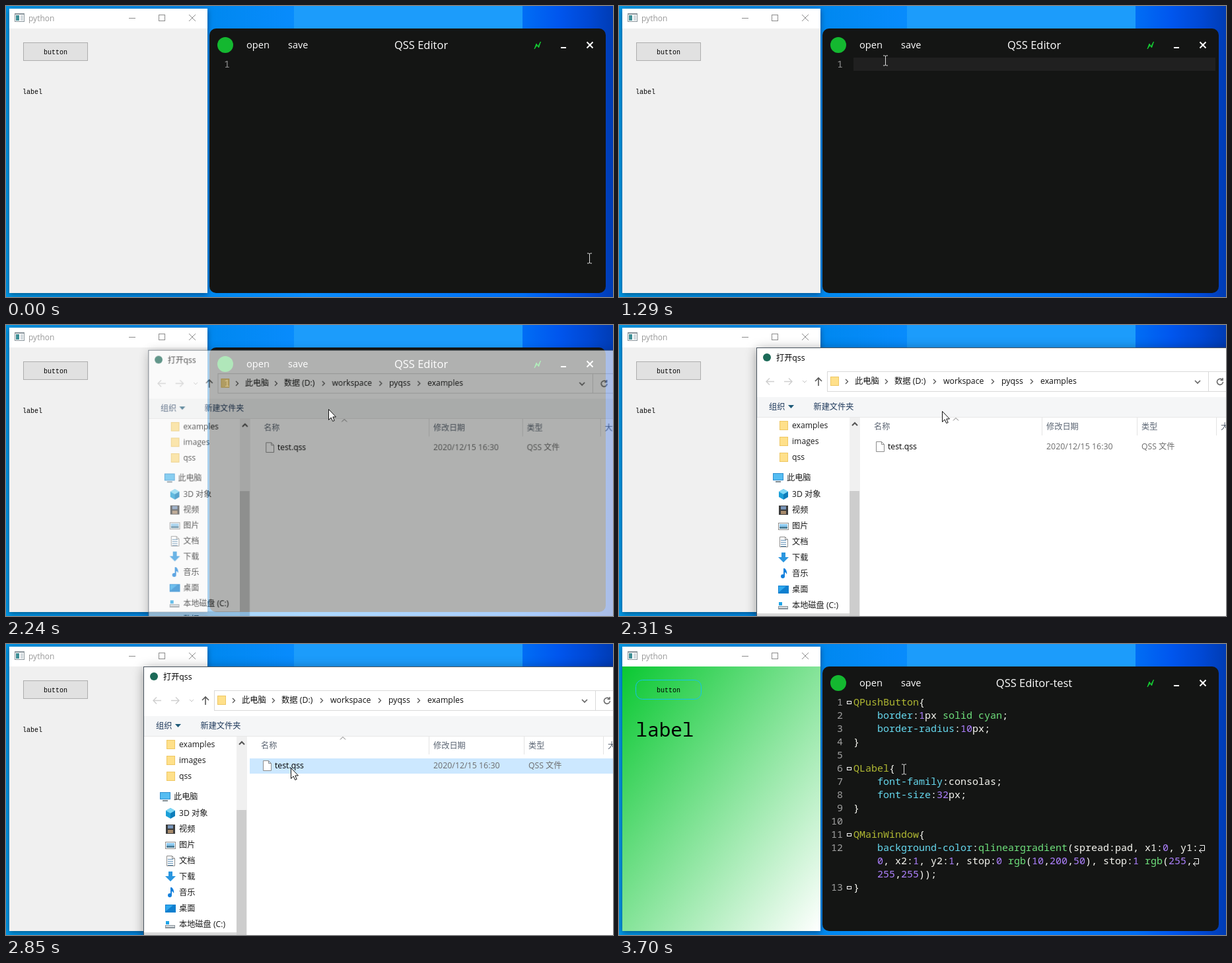
Recreate the animation shown at these times as an HTML page with a canvas. Size 919x440 px, loop 4.73 s.

```html
<!DOCTYPE html>
<html lang="en">
<head>
<meta charset="utf-8">
<title>QSS Editor</title>
<style>
  html, body { margin: 0; width: 100%; height: 100%; overflow: hidden; background: #0088f0; }
  canvas { display: block; }
</style>
</head>
<body>
<canvas id="stage" width="919" height="440"></canvas>
<script>
const LOOP = 4730;
const SANS = '"Open Sans", "Noto Sans CJK SC", "Noto Sans CJK", sans-serif';
const MONO = '"Noto Sans Mono", monospace';
const PIXEL = '"Liberation Mono", monospace';

const screen2d = document.getElementById('stage').getContext('2d');
const layer = document.createElement('canvas');
layer.width = 1100;
layer.height = 520;
const layer2d = layer.getContext('2d');
let g = screen2d;

const bursts = [[70, 510, 7], [680, 1140, 7], [1220, 1690, 7], [1760, 1840, 2],
  [2010, 2470, 7], [2540, 2700, 3], [2850, 3170, 5], [3700, 3700, 1]];

// Pointer stops: [time, x, y]
const path = [[0, 883, 381], [510, 649, 280], [604, 649, 280], [1140, 415, 94], [1298, 403, 82],
  [1690, 392, 62], [1950, 392, 62], [2087, 437, 107], [2240, 488, 127], [2393, 490, 132],
  [2470, 488, 140], [2700, 431, 187], [3170, 431, 187], [3700, 431, 189], [LOOP, 431, 189]];

const code = [
  'QPushButton{', '    border:1px solid cyan;', '    border-radius:10px;', '}', '',
  'QLabel{', '    font-family:consolas;', '    font-size:32px;', '}', '',
  'QMainWindow{', '    background-color:qlineargradient(spread:pad, x1:0, y1:',
  '    0, x2:1, y2:1, stop:0 rgb(10,200,50), stop:1 rgb(255,', '    255,255));', '}'];
const tokens = /(^Q\w+)|(^ +[a-z-]+)|\b(\d+)|(solid|cyan|qlineargradient|rgb)|./g;
const tokenColors = ['#b0b832', '#66d9ef', '#ae81ff', '#6fe07c'];

const clamp = v => Math.max(0, Math.min(1, v));

function rect(x, y, w, h, color) {
  g.fillStyle = color;
  g.fillRect(x, y, w, h);
}
function frame(x, y, w, h, color) {
  g.strokeStyle = color;
  g.lineWidth = 1;
  g.strokeRect(x + .5, y + .5, w - 1, h - 1);
}
function round(x, y, w, h, r, color) {
  g.beginPath();
  g.roundRect(x, y, w, h, r);
  g.fillStyle = color;
  g.fill();
}
function disc(x, y, r, color) {
  round(x - r, y - r, 2 * r, 2 * r, r, color);
}
function text(str, x, y, size, color, font = SANS, align = 'left') {
  g.font = `${size}px ${font}`;
  g.textAlign = align;
  g.fillStyle = color;
  g.fillText(str, x, y);
}
function shape(x, y, d, fill, stroke, width = 1) {
  const p = new Path2D(d);
  g.save();
  g.translate(x, y);
  if (fill) { g.fillStyle = fill; g.fill(p); }
  if (stroke) { g.strokeStyle = stroke; g.lineWidth = width; g.stroke(p); }
  g.restore();
}
function withShadow(blur, alpha, draw) {
  g.save();
  g.shadowColor = `rgba(0,0,0,${alpha})`;
  g.shadowBlur = blur;
  g.shadowOffsetY = 2;
  draw();
  g.restore();
}
function gradient(x0, y0, x1, y1, stops) {
  const fill = g.createLinearGradient(x0, y0, x1, y1);
  stops.forEach(([at, color]) => fill.addColorStop(at, color));
  return fill;
}

function refreshTime(t) {
  let last = 0;
  for (const [from, to, count] of bursts)
    for (let i = 0; i < count; i++) {
      const at = from + (to - from) * i / Math.max(1, count - 1);
      if (at <= t + 9) last = at;
    }
  return last;
}
function pointerAt(t) {
  const i = Math.max(1, path.findIndex(p => p[0] >= t));
  const [t0, x0, y0] = path[i - 1], [t1, x1, y1] = path[i];
  const k = (t - t0) / (t1 - t0);
  return [Math.round(x0 + (x1 - x0) * k), Math.round(y0 + (y1 - y0) * k)];
}

function drawDesktop() {
  rect(0, 0, 919, 440, gradient(0, 0, 919, 0, [[0, '#0098e8'], [.34, '#0088f0'], [.5, '#0a8cff'],
    [.85, '#006ef5'], [.91, '#0056ee'], [.96, '#0048d4'], [1, '#003cb4']]));
  rect(436, 0, 346, 60, '#1c9cfb');
}

function drawPreview(styled) {
  withShadow(8, .45, () => rect(5, 4, 300, 430, '#fff'));
  rect(13, 11, 15, 13, '#8a959c');
  rect(14, 13, 13, 10, '#fff');
  rect(15, 14, 5, 8, '#3f8f96');
  rect(22, 14, 4, 8, '#d3dadf');
  text('python', 34, 23, 12, '#999');
  rect(186, 18, 10, 1, '#8c8c8c');
  frame(231, 13, 10, 10, '#8c8c8c');
  shape(277, 13, 'M0 0L10 10M10 0L0 10', null, '#8c8c8c');

  if (styled) {
    // Equal-colour lines run parallel to the other diagonal
    g.save();
    g.translate(5, 34);
    g.scale(300, 400);
    rect(0, 0, 1, 1, gradient(0, 0, 1, 1, [[0, 'rgb(10,200,50)'], [1, '#fff']]));
    g.restore();
    g.beginPath();
    g.roundRect(25.5, 54.5, 99, 29, 10);
    g.strokeStyle = '#14c4ea';
    g.lineWidth = 1;
    g.stroke();
    text('label', 25.5, 140, 29.3, '#000', MONO);
  } else {
    rect(5, 34, 300, 400, '#f0f0f0');
    rect(26, 55, 98, 28, '#e1e1e1');
    frame(26, 55, 98, 28, '#adadad');
    text('label', 25, 133, 10, '#000', PIXEL);
  }
  text('button', 57, 73, 10, '#000', PIXEL);
}

function drawCode() {
  code.forEach((row, i) => {
    const y = 93 + 20 * i;
    const number = i < 12 ? i + 1 : i === 14 ? 13 : '';
    text(number, 339, y, 15, '#a0a0a0', MONO, 'right');
    if (/^Q/.test(row) || i === 14) frame(345, y - 7, 7, 5, '#fff');
    for (const m of row.matchAll(tokens)) {
      const kind = m.slice(1).findIndex(Boolean);
      text(m[0], 355 + 9 * m.index, y, 15, tokenColors[kind] || '#f8f8f2', MONO);
    }
    if (i === 11 || i === 12)
      shape(355.5 + 9 * row.length, y - 9, 'M2 .5H9V8.5H1M4.5 5L1 8.5L4.5 12', null, '#fff');
  });
}

function drawEditor(t, loaded) {
  round(308, 34, 600, 400, 10, '#141514');
  disc(332, 59, 12, '#14b830');
  if (t >= 1370 && t < 2160)
    round(352, 38, 60, 40, 20, t >= 1755 && t < 1835 ? '#10702a' : '#14541f');
  text('open', 364, 64, 14.7, '#fff');
  text('save', 427, 64, 14.5, '#fff');
  text(loaded ? 'QSS Editor-test' : 'QSS Editor', 628.5, 65, 16.5, '#fff', SANS, 'center');
  shape(799, 53, 'M1 12L4 4L6.5 8L10.5 1L7.5 10L5 6.5Z', '#14c832', '#14c832');
  rect(840, 62, 8, 2, '#fff');
  shape(879.5, 54.5, 'M0 0L9 9M9 0L0 9', null, '#fff', 2);

  if (loaded) return drawCode();
  text('1', 339, 93, 15, '#909090', MONO, 'right');
  if (t >= 505 && t < 1755) {
    rect(355, 78, 548, 20, '#202020');
    if ((t - 505) % 1060 < 530) rect(355, 79, 1, 18, '#f8f8f2');
  }
}

function folder(x, y) {
  rect(x, y - 7, 9, 14, '#e9bd50');
  rect(x + 1, y - 6, 12, 13, '#ffe08a');
  frame(x, y - 7, 13, 14, '#eec763');
}
function page(x, y) {
  shape(x, y - 8, 'M.5 .5H8.5L12.5 4.5V15.5H.5ZM8.5 .5V4.5H12.5', '#fff', '#8c8c8c');
}
function drive(x, y) {
  rect(x, y + 1, 15, 5, '#8b949b');
  rect(x + 1, y + 2, 13, 2, '#d5dade');
}
function monitor(x, y) {
  rect(x, y - 7, 16, 11, '#2d8fd0');
  rect(x + 1, y - 6, 14, 9, '#55bdf2');
  rect(x + 4, y + 5, 8, 2, '#7d8a92');
}

const places = [
  ['3D 对象', (x, y) => {
    shape(x, y - 8, 'M8 0L15 4V12L8 16L1 12V4Z', '#1a9fd8');
    shape(x, y - 8, 'M8 0L15 4L8 8L1 4Z', '#7fd8f5');
    shape(x, y - 8, 'M8 8L15 4V12L8 16Z', '#0e7dba');
  }],
  ['视频', (x, y) => {
    rect(x + 1, y - 7, 14, 14, '#3c3c3c');
    rect(x + 4, y - 6, 8, 5, '#7794b8');
    rect(x + 4, y + 1, 8, 5, '#a88b6c');
  }],
  ['图片', (x, y) => {
    rect(x, y - 5, 16, 11, '#fff');
    frame(x, y - 5, 16, 11, '#8c8c8c');
    rect(x + 2, y - 3, 12, 4, '#8cc9f0');
    rect(x + 2, y + 1, 12, 3, '#4d7f99');
  }],
  ['文档', (x, y) => {
    page(x + 2, y);
    for (let i = 0; i < 4; i++) rect(x + 4, y - 3 + 3 * i, 8, 1, '#5a8db5');
  }],
  ['下载', (x, y) => shape(x, y - 8, 'M5 0H11V7H16L8 15L0 7H5Z', '#2a96e0')],
  ['音乐', (x, y) => {
    shape(x + 8, y - 8, 'M0 0H2Q6 4 5 9Q4 6 2 6V12H0Z', '#1480dc');
    disc(x + 7, y + 4, 3, '#1480dc');
  }],
  ['桌面', (x, y) => {
    rect(x, y - 6, 16, 12, '#0f7fcf');
    shape(x, y - 6, 'M1 1H12L1 10Z', '#2fa8ee');
  }],
  ['本地磁盘 (C:)', (x, y) => { drive(x, y); rect(x + 1, y - 5, 5, 5, '#1ea4e8'); }],
  ['数据 (D:)', drive]];

function drawSidebar() {
  const label = (str, x, y) => text(str, x, y + 4, 12.2, '#1a1a1a');
  rect(209, 436, 140, 24, '#d9d9d9');
  ['examples', 'images', 'qss'].forEach((name, i) => {
    folder(243, 152 + 24 * i);
    label(name, 262, 152 + 24 * i);
  });
  monitor(233, 231);
  label('此电脑', 254, 231);
  places.forEach(([name, icon], i) => {
    const y = 256 + 24 * i;
    icon(241, y);
    label(name, 262, y);
  });
  rect(349, 140, 16, 360, '#f0f0f0');
  rect(349, 251, 15, 249, '#cdcdcd');
  shape(353, 148, 'M0 4L4 0L8 4', null, '#555', 2);
}

function drawDialog(t) {
  withShadow(16, .4, () => rect(209, 35, 871, 465, '#fff'));
  frame(208, 34, 873, 467, '#4a5560');
  disc(224, 49, 6, '#1c6a58');
  text('打开qss', 238, 54, 12.2, '#000');

  shape(222, 85.5, 'M13 0H1M6 -5L1 0L6 5', null, '#cfcfcf', 1.4);
  shape(250, 85.5, 'M0 0H12M7 -5L12 0L7 5', null, '#cfcfcf', 1.4);
  shape(278, 84, 'M0 0L3 3L6 0', null, '#c4c4c4');
  shape(302, 80, 'M0 12V0M-5 5L0 0L5 5', null, '#5a5a5a', 1.6);
  frame(315, 70, 640, 31, '#d9d9d9');
  rect(892, 70, 1, 31, '#d9d9d9');
  folder(320, 85);
  [[345, '此电脑', 357], [405, '数据 (D:)', 417], [478, 'workspace', 491],
    [566, 'pyqss', 579], [625, 'examples', 638]].forEach(([arrow, name, x]) => {
    shape(arrow - 2, 82, 'M0 0L3.5 3.5L0 7', null, '#555', 1.3);
    text(name, x, 89, 12.3, '#111');
  });
  shape(872, 84, 'M0 0L4 4L8 0', null, '#666', 1.7);
  shape(910, 86, 'M3 -3.5A4.5 4.5 0 1 0 4.5 0M4 -6V-2.5H.5', null, '#666', 1.5);

  rect(209, 109, 871, 30, '#f5f6f7');
  rect(209, 139, 871, 1, '#e8e8e8');
  text('组织', 227, 128, 12.2, '#1e395b');
  shape(256, 121, 'M0 0H9L4.5 5Z', '#1e5a78');
  text('新建文件夹', 294.5, 128, 12.2, '#1e395b');
  drawSidebar();

  [['名称', 386], ['修改日期', 647], ['类型', 791], ['大小', 911]].forEach(([name, x]) => {
    text(name, x, 158, 12.2, '#5b6573');
    if (x > 400) rect(x - 7, 140, 1, 27, '#e3e3e3');
  });
  shape(506, 140.5, 'M0 4L4 0L8 4', null, '#777');
  if (t >= 2690) rect(369, 173, 700, 23, t >= 2840 ? '#cce8ff' : '#e5f3ff');
  page(389, 184);
  text('test.qss', 407, 188, 12.3, '#000');
  text('2020/12/15 16:30', 647, 188, 12.4, '#6d6d6d');
  text('QSS 文件', 791, 188, 12.2, '#6d6d6d');
}

function showDialog(t) {
  const shown = Math.min(clamp((t - 2140) / 150), clamp((3120 - t) / 150));
  if (!shown) return;
  g = layer2d;
  g.clearRect(0, 0, layer.width, layer.height);
  drawDialog(t);
  g = screen2d;
  const scale = .95 + .05 * shown;
  g.save();
  g.globalAlpha = shown;
  g.translate(645, 256);
  g.scale(scale, scale);
  g.drawImage(layer, -645, -256);
  g.restore();
}

function drawPointer(t) {
  const [x, y] = pointerAt(t);
  if (t >= 1370 && t < 3000)
    shape(x + .5, y + .5, 'M0 0V16L3.7 12.5L6.2 18L8.7 17L6.3 11.5H11Z', '#fff', '#111');
  else
    shape(x + .5, y + .5, 'M-3.5 -7.5H-1L0 -6.5L1 -7.5H3.5M0 -7V7M-3.5 7.5H-1L0 6.5L1 7.5H3.5', null, '#ddd');
}

function draw() {
  const t = refreshTime(performance.now() % LOOP);
  const loaded = t >= 3000;
  drawDesktop();
  drawPreview(loaded);
  drawEditor(t, loaded);
  showDialog(t);
  drawPointer(t);
  requestAnimationFrame(draw);
}
draw();
</script>
</body>
</html>
```
